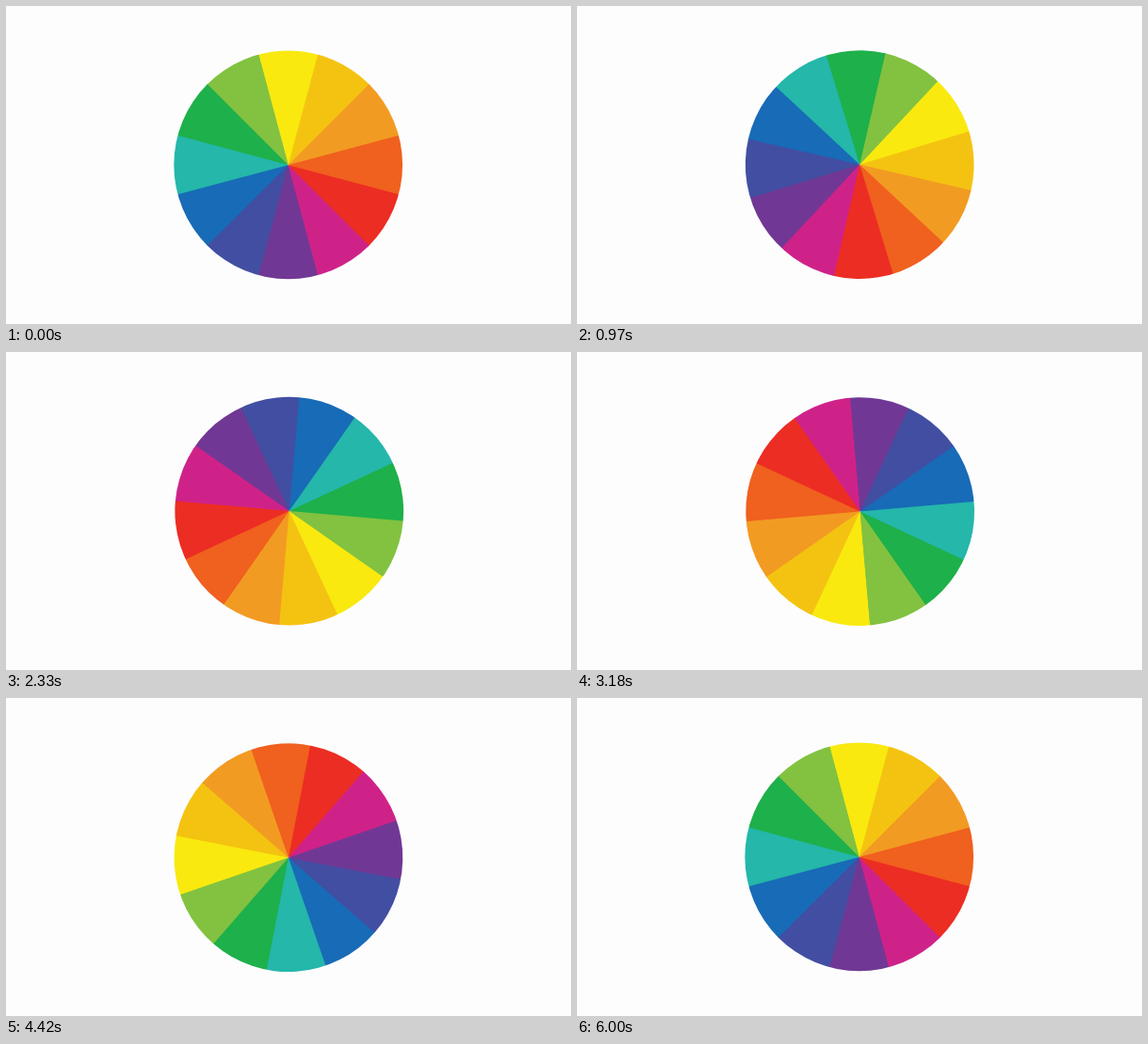
An HTML page with a canvas that plays this animation: 600 by 338 pixels, repeating every 6030 ms.

```html
<!DOCTYPE html>
<html lang="en">
<head>
<meta charset="utf-8">
<title>Colour wheel</title>
<style>
  html, body { margin: 0; width: 100%; height: 100%; overflow: hidden; background: #fdfdfe; }
  canvas { display: block; }
</style>
</head>
<body>
<canvas width="600" height="338"></canvas>
<script>
const ctx = document.querySelector('canvas').getContext('2d');
const LOOP = 6030;
const FPS = 30;
const RADIUS = 121.4;
const SLICE = Math.PI / 6;
const STEP = Math.PI / 90; // the wheel turns two degrees per step
const colors = [
  '#f9e90f', '#f4c311', '#f29b22', '#f0601e', '#ec2d23', '#cf2289',
  '#703894', '#424ea2', '#186bb6', '#24b7aa', '#1eb04a', '#82c240'
];

function sector(color, start, angle, radius) {
  ctx.fillStyle = color;
  ctx.beginPath();
  ctx.moveTo(0, 0);
  ctx.arc(0, 0, radius, start, start + angle);
  ctx.fill();
}

function draw(now) {
  const step = Math.round((now % LOOP) * FPS / 1000);
  ctx.clearRect(0, 0, 600, 338);
  ctx.save();
  ctx.translate(300.2, 169.2);
  ctx.rotate(step * STEP);
  ctx.translate(-0.5, -0.3); // the wheel sits slightly off its pivot

  // Each slice runs under the next, and the last colour also lies under the first.
  const count = colors.length;
  for (let i = -1; i < count; i++) {
    const start = -Math.PI / 2 + (i - 0.5) * SLICE;
    const width = i === count - 1 ? SLICE : SLICE * 1.5;
    sector(colors[(i + count) % count], start, width, RADIUS + 5);
  }

  // Trim to a clean disc.
  ctx.globalCompositeOperation = 'destination-in';
  sector('#000', 0, 2 * Math.PI, RADIUS);
  ctx.restore();
}

function tick() {
  draw(performance.now());
  requestAnimationFrame(tick);
}
tick();
</script>
</body>
</html>
```
